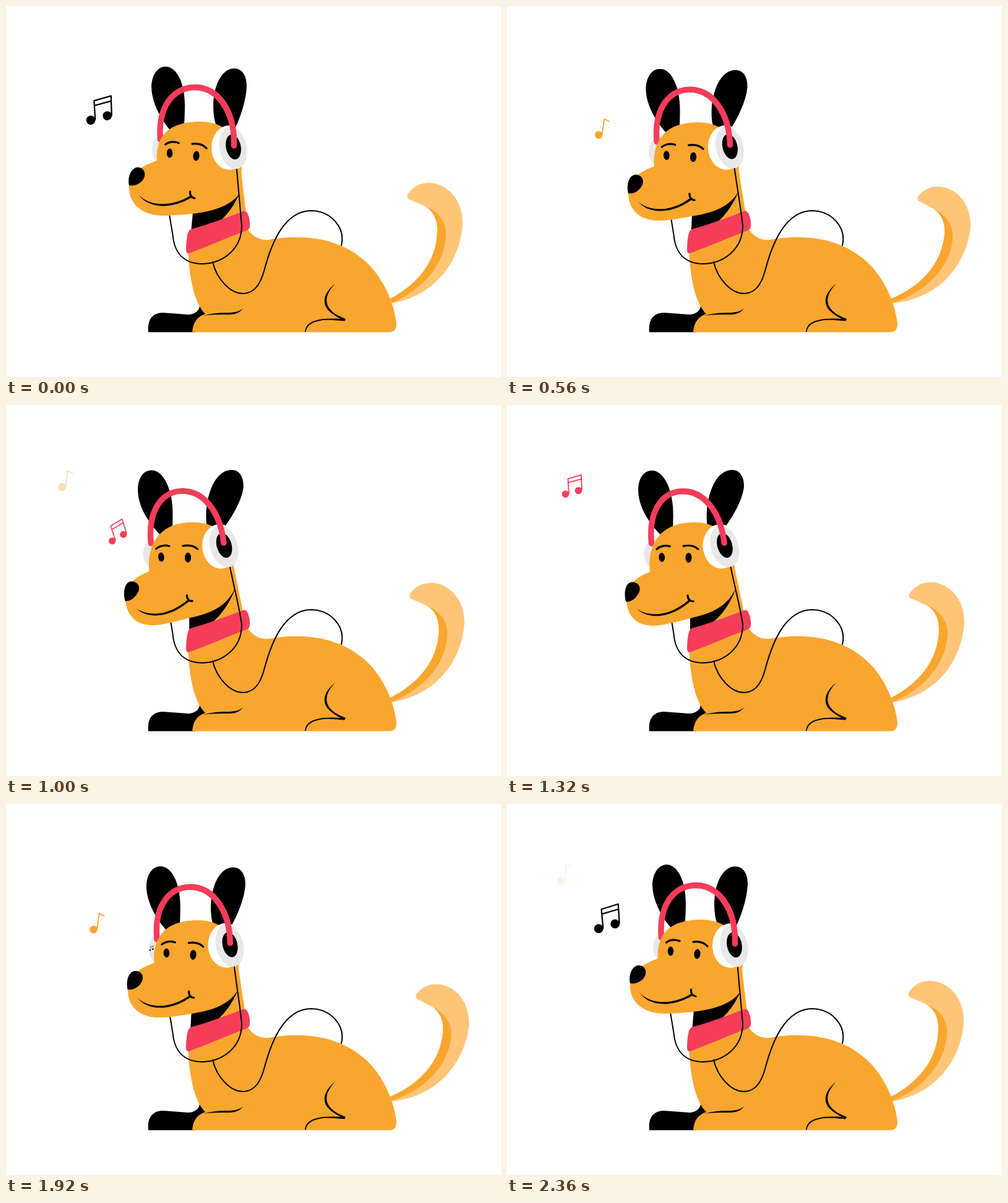
These frames come from a looping animation (800 by 600 pixels, 2.4 s). An HTML page:

```html
<!DOCTYPE html>
<html lang="en">
<head>
<meta charset="utf-8">
<title>Dog listening to music</title>
<style>
  html, body { margin: 0; width: 100%; height: 100%; overflow: hidden; background: #fff; }
  svg { display: block; width: 100vw; height: 100vh; }
  .fur { fill: #f9a62f; }
  .tip { fill: #fec577; }
  .red { fill: #f53d5a; }
  .pad { fill: #e8e8e8; }
  .white { fill: #fff; }
  .line { fill: none; stroke: #000; stroke-width: 2; stroke-linecap: round; }
  .bold { stroke-width: 3.2; }
  .band { fill: none; stroke: #f53d5a; stroke-width: 9.4; stroke-linecap: round; }
  .stem { fill: none; stroke-width: 1.8; stroke-linejoin: round; }
</style>
</head>
<body>
<svg viewBox="0 0 800 600">
  <g id="tail">
    <path class="tip" d="M650 312Q646 307 652 301C660 291 671 286 684 286C714 287 738 314 738 350C736 405 700 468 622 481L620 474C662 452 697 415 697 362C697 345 690 330 676 323Z"/>
    <path class="fur" d="M676 323C700 332 711 350 711 367C711 407 686 453 624 480L620 474C662 452 697 415 697 362C697 345 690 330 676 323Z"/>
  </g>

  <path d="M230 527.4C228 508 236 496 254 496L294 499C306 499 313 492 313 484L325 498L306 527.4Z"/>
  <path class="fur" d="M294 392C296 440 304 480 322 498C308 503 302 513 301 527.4L621 527.4Q631 527 631 513C627 480 610 440 582 414C560 394 525 374 470 374C450 374 437 376 425 378C408 380 396 370 390 360Z"/>
  <path d="M318 501C332 497 345 496 358 496C370 496 377 494 383 489C377 497 370 499 358 499C343 499 330 499 318 501Z"/>
  <path d="M532 449C512 465 511 481 521 492C528 500 538 504 547 509.5L549 506C539 502 530 498 524 490.5C515 480 516 466 532 449Z"/>
  <path d="M548 506C536 505.500 525 505 514 506C495 508 484 514 483 527L484.5 527C486 515 498 509.500 514 508C526 507 537 508.500 547 509.500Z"/>

  <path id="neck" class="fur"/>
  <path id="throat"/>
  <path class="red" d="M299 361C325 354 360 341 383 332Q387 330 390 335Q395 345 394 356Q394 361 389 363C360 374 325 389 297 399.5Q291 401.5 291 394Q291 378 294 367Q296 362 299 361Z"/>
  <path class="line" d="M262 325L269.5 370C272 400 288 417 318 417C350 416 381 394 381 355"/>
  <path class="line" d="M334 414C340 440 362 466 384 465C405 464 413 444 418 425C428 388 448 331 494 331C525 332 549 358 542 387"/>

  <g class="tilt"><ellipse class="pad" cx="254" cy="232" rx="18" ry="24"/></g>
  <path id="earL"/>
  <path id="earR"/>
  <path id="bandBack" class="band"/>
  <path id="face" class="fur"/>
  <path id="nose"/>
  <path id="smile"/>
  <path id="tick" class="line bold"/>
  <path id="wire" class="line"/>
  <g class="tilt">
    <ellipse cx="264.5" cy="238" rx="4.8" ry="7.4"/>
    <ellipse cx="307.5" cy="242.5" rx="5.1" ry="8" transform="rotate(6 307.5 242.5)"/>
    <path class="line bold" d="M257.5 224C263 219.5 272 218.5 279 221.5M301 223C309 222 318 223.5 324 230"/>
    <ellipse class="white" cx="361" cy="229" rx="29" ry="36"/>
    <ellipse class="pad" cx="367" cy="229.5" rx="22" ry="34.5" transform="rotate(-12 367 229.5)"/>
    <ellipse cx="367.5" cy="228" rx="12" ry="20.5" transform="rotate(-11 367.5 228)"/>
  </g>
  <path id="bandFront" class="band"/>
  <g id="notes"></g>
</svg>

<script>
const LOOP = 2400, LIFE = 905;
const $ = id => document.getElementById(id);

// Head parts: pose looking up, pose nodding down.
const poses = {
  neck: [
    'M330 270L379 250C381 285 386 315 388 336L345 352Z',
    'M320 270L365 250C371 278 379 315 383 336L335 354Z'],
  throat: [
    'M303 322L299 367L346 348C360 335 370 320 377 304Z',
    'M296 322L296 367L332 352C348 340 362 318 369 299Z'],
  earL: [
    'M270 206C250 185 235 155 235 130C236 110 246 98 258 98C276 98 289 125 289 160C289 180 288 190 287 205Z',
    'M250 212C228 190 212 163 212 138C212 117 222 106 234 106C253 106 266 135 268 165C269 180 268 195 268 210Z'],
  earR: [
    'M346 203C338 195 335 180 335 160C336 125 350 101 369 101C382 101 389 113 389 130C388 152 380 178 368 203Z',
    'M325 203C322 190 322 175 324 160C330 125 345 105 364 105C377 105 383 117 383 132C381 152 366 180 348 203Z'],
  bandBack: [
    'M249.5 216C245 160 272 131.5 306 131.5C342 131.5 370 170 368.5 226',
    'M233.5 224C228 170 252 139.5 284 139.5C318 139.5 345 172 351 223'],
  bandFront: [
    'M306 131.5C342 131.5 370 170 368.5 226',
    'M284 139.5C318 139.5 345 172 351 223'],
  face: [
    'M244 250C242 222 252 187 314 187C345 187 381 203 381 262L376 305C362 323 336 332 301 336C285 338 265 339 255 339C222 339 199 322 199 294C199 272 218 259 244 250Z',
    'M231 270C227 240 237 191 299 190C330 188 368 205 367 258L368 300C352 330 325 338 296 345C275 350 255 357 235 357C210 357 195 342 193 318C192 290 210 278 231 270Z'],
  nose: [
    'M199 290C196 277 202 262 212 261C222 260 227 270 223 278C219 287 208 292 199 290Z',
    'M192 318C188 302 192 287 202 286.5C212 287 217 294 213.5 303C209 312 201 320 192 318Z'],
  smile: [
    'M214 305C231 324 268 326 299 306L301 309C268 329.5 230 328 214 305Z',
    'M210.5 330C227 342.5 262 344 295 314L297 317C262 348 226 346 210.5 330Z'],
  tick: [
    'M297.5 300C297 307 300 310 305 311',
    'M292 308C292 314 296 318 301 317.5'],
  wire: [
    'M371 240C373 270 379 330 381 356',
    'M357 238C361 268 379.5 335 381 356']
};

function morph(a, b, k) {
  const end = b.match(/[\d.]+/g);
  let i = 0;
  return a.replace(/[\d.]+/g, n => (+n + (end[i++] - n) * k).toFixed(2));
}

const single = {
  heads: [[-6.3, 10.5]], r: 6.3, stem: 'M-.7 10L2.8 -15.5L11.5 -11'
};
const beamed = {
  heads: [[-11.2, 13], [9.8, 7.3]], r: 5.8,
  stem: 'M-5.5 13L-7.2 -11.7L14.3 -18L15.3 7M-7 -5.5L14.5 -11.5'
};

// Each note flies along a cubic Bezier curve.
const notes = [
  { shape: beamed, color: '#000', size: 1.27, spin: .3, starts: [-545, 1895],
    x: [240, 181, 139, 114], y: [234, 229, 173, 64] },
  { shape: single, color: '#f9a62f', size: 1, spin: 0, starts: [160, 1480],
    x: [238, 164.7, 115.3, 92], y: [234, 219.3, 176.7, 109] },
  { shape: beamed, color: '#f63e5b', size: 1, spin: 1, starts: [800],
    x: [238, 142, 80, 53], y: [234, 205.7, 101, 39] }
];

function make(tag, attrs, parent) {
  const el = document.createElementNS('http://www.w3.org/2000/svg', tag);
  for (const k in attrs) el.setAttribute(k, attrs[k]);
  return parent.appendChild(el);
}

for (const n of notes) {
  n.el = make('g', { fill: n.color, stroke: 'none' }, $('notes'));
  for (const [cx, cy] of n.shape.heads) make('circle', { cx, cy, r: n.shape.r }, n.el);
  make('path', { class: 'stem', stroke: n.color, d: n.shape.stem }, n.el);
}

const bezier = ([a, b, c, d], u) => {
  const v = 1 - u;
  return v * v * v * a + 3 * v * v * u * b + 3 * v * u * u * c + u * u * u * d;
};
const swing = (t, period) => (1 - Math.cos(2 * Math.PI * t / period)) / 2;

function drawNote(n, t) {
  const age = n.starts.map(s => t - s).find(a => a > 0 && a < LIFE);
  n.el.setAttribute('visibility', age ? 'visible' : 'hidden');
  if (!age) return;
  const u = age / 900;
  const turn = n.spin * (-15 + 42 * (u - .222) + 60 * (u - .222) * (u - .578));
  const grow = n.size * Math.sin(Math.PI / 2 * Math.min(1, age / 240));
  n.el.setAttribute('transform',
    `translate(${bezier(n.x, u)} ${bezier(n.y, u)}) rotate(${turn}) scale(${grow})`);
  n.el.setAttribute('opacity', Math.min(1, (LIFE - age) / 175));
}

const tilted = document.querySelectorAll('.tilt');
const begin = performance.now();

function draw() {
  const t = (performance.now() - begin) % LOOP;
  const nod = 1.02 * swing(t, LOOP);
  const flick = 2 * Math.max(0, Math.sin(2 * Math.PI * t / LOOP)) ** 2;
  for (const id in poses) $(id).setAttribute('d', morph(...poses[id], nod));
  for (const g of tilted) g.setAttribute('transform', `rotate(${-5.2 * nod} 350 400)`);
  $('earR').setAttribute('transform', `rotate(${flick} 350 195)`);
  $('tail').setAttribute('transform', `rotate(${5.2 * swing(t, LOOP / 2)} 624 477)`);
  for (const n of notes) drawNote(n, t);
  requestAnimationFrame(draw);
}
draw();
</script>
</body>
</html>
```
